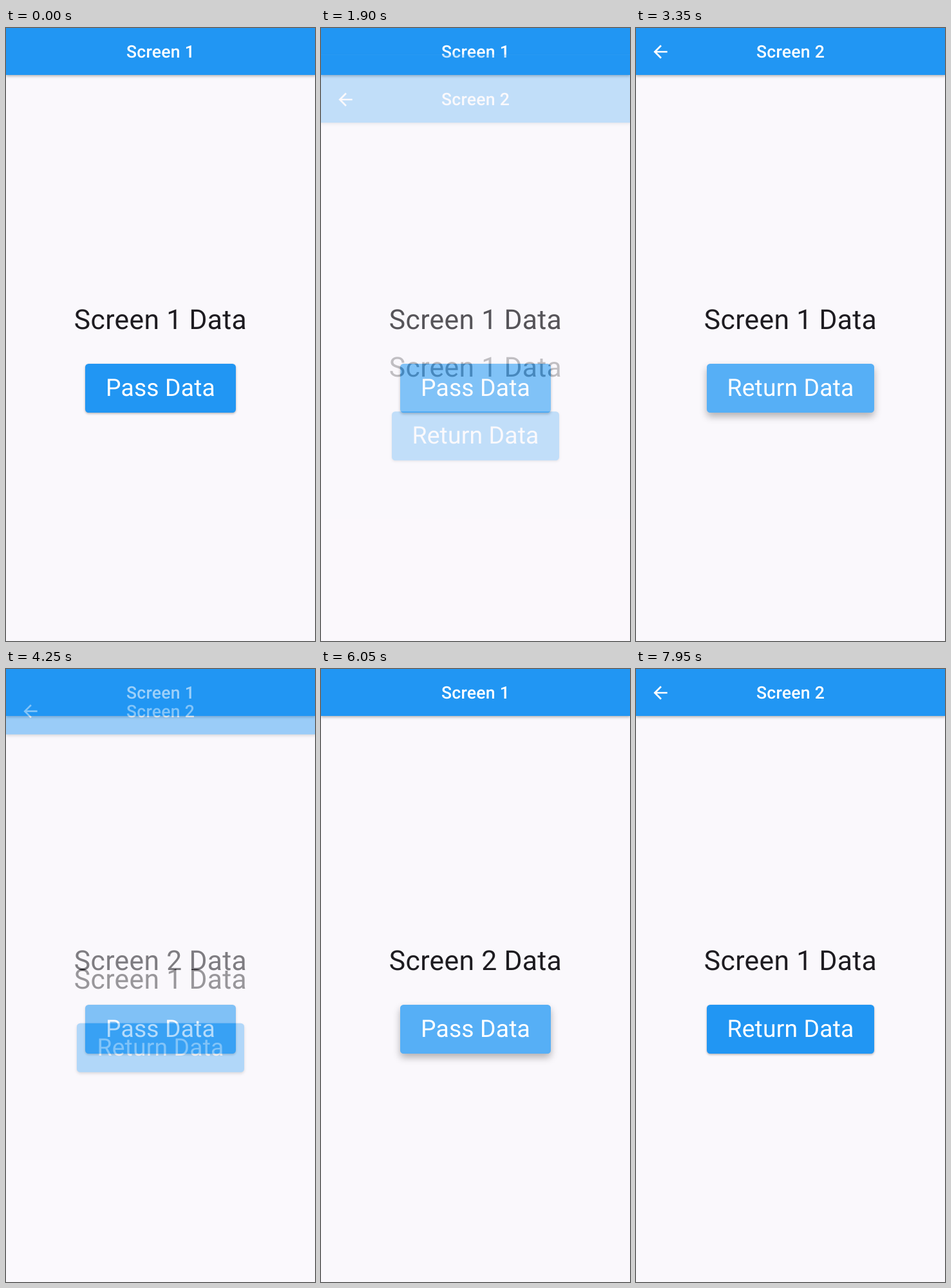
An HTML page for the animation above (8 s loop, 480x953 px).

```html
<!DOCTYPE html>
<html lang="en">
<head>
<meta charset="utf-8">
<title>Passing data between screens</title>
<style>
  html, body { margin: 0; width: 100%; height: 100%; overflow: hidden; background: #faf8fc; }
  #stage {
    position: relative; width: 480px; height: 953px; overflow: hidden;
    font-family: Roboto, "Noto Sans", sans-serif;
    text-rendering: geometricPrecision; text-align: center; white-space: nowrap;
  }
  /* the page reaches up behind the status bar, above the visible stage */
  .page { position: absolute; left: 0; top: 0; width: 480px; height: 953px; }
  .page::before { content: ""; position: absolute; inset: -33px 0 0; background: #faf8fc; }
  .bar {
    position: absolute; left: 0; top: -33px; width: 480px; height: 106px;
    background: #2196f3; box-shadow: 0 2px 4px rgba(0, 0, 0, .28);
  }
  .title {
    position: absolute; left: 0; top: 17px; width: 480px;
    font-size: 26.67px; font-weight: 500; line-height: 40px; letter-spacing: .2px; color: #fff;
  }
  .back { position: absolute; left: 21.5px; top: 20.5px; width: 32px; height: 32px; fill: #fff; }
  .data {
    position: absolute; left: 0; top: 424px; width: 480px;
    font-size: 42.67px; line-height: 60px; letter-spacing: .33px; color: #1d1b20;
  }
  .btn {
    position: absolute; top: 522px; height: 76px; border-radius: 5.3px; background: #2196f3;
  }
  .ink { position: absolute; inset: 0; overflow: hidden; border-radius: 5.3px; }
  .ink i { position: absolute; border-radius: 50%; background: #fff; }
  .btn span {
    position: absolute; inset: 0; font-size: 37.33px; line-height: 76px;
    letter-spacing: .133px; color: #fff;
  }
</style>
</head>
<body>
<div id="stage"></div>
<script>
const LOOP = 8000, STEP = 50, SLIDE = 246.5;
const stage = document.getElementById('stage');

function makeScreen(title, label, width, hasBack) {
  const page = document.createElement('div');
  page.className = 'page';
  const arrow = '<svg class="back" viewBox="0 0 24 24"><path d="M20 11H7.83l5.59-5.59L12 4l-8 8 8 8 1.41-1.41L7.83 13H20z"/></svg>';
  page.innerHTML = `<div class="bar"></div>${hasBack ? arrow : ''}
    <div class="title">${title}</div>
    <div class="data">Screen 1 Data</div>
    <div class="btn"><div class="ink"><i></i></div><span>${label}</span></div>`;
  stage.append(page);
  const btn = page.querySelector('.btn');
  btn.style.width = width + 'px';
  btn.style.left = 240 - width / 2 + 'px';
  return { page, btn, width, data: page.querySelector('.data'), ripple: page.querySelector('i') };
}

const first = makeScreen('Screen 1', 'Pass Data', 234, false);
const second = makeScreen('Screen 2', 'Return Data', 260, true);

// Long presses: the screen changes on release.
const presses = [
  { on: first, x: 312, y: 570, down: 385, up: 1766 },
  { on: second, x: 311, y: 577, down: 2580, up: 4133 },
  { on: first, x: 320, y: 562, down: 5289, up: 6734 }
];

const clamp = v => Math.min(1, Math.max(0, v));
const mix = (a, b, k) => a + (b - a) * k;

function bezier(x1, y1, x2, y2) {
  const at = (a, b, u) => 3 * (1 - u) * (1 - u) * u * a + 3 * (1 - u) * u * u * b + u * u * u;
  return x => {
    if (x <= 0 || x >= 1) return clamp(x);
    let lo = 0, hi = 1;
    for (let i = 0; i < 24; i++) {
      const mid = (lo + hi) / 2;
      if (at(x1, x2, mid) < x) lo = mid; else hi = mid;
    }
    return at(y1, y2, lo);
  };
}
const ease = bezier(.25, .1, .25, 1);
const easeIn = bezier(.42, 0, 1, 1);
const fastOut = bezier(.4, 0, .2, 1);

function route(t) {
  const [push, pop, again] = presses.map(p => clamp((t - p.up) / 300));
  return t < presses[1].up ? push : t < presses[2].up ? 1 - pop : again;
}

function drawButton(screen, t) {
  const p = presses.filter(q => q.on === screen && t >= q.down).pop();
  let lift = 0, alpha = 0;
  if (p) {
    lift = fastOut(clamp((t - p.down) / 200)) * (1 - fastOut(clamp((t - p.up) / 200)));
    alpha = .24 * clamp((t - p.down) / 75) * (1 - clamp((t - p.up - 225) / 150));
    const k = ease(clamp((t - p.down) / 1000));
    const reach = Math.hypot(screen.width, 76) / 2;
    const r = mix(reach * .3, reach + 5, k);
    const x = mix(p.x, 240, k) - (240 - screen.width / 2);
    const y = mix(p.y, 560, k) - 522;
    Object.assign(screen.ripple.style, {
      left: x - r + 'px', top: y - r + 'px', width: 2 * r + 'px', height: 2 * r + 'px'
    });
  }
  screen.ripple.style.opacity = alpha;
  screen.btn.style.boxShadow =
    `0 ${mix(1.6, 6, lift)}px ${mix(3.5, 12, lift)}px rgba(0,0,0,.29)`;
}

function draw(t) {
  // the first push stalls briefly before it shows
  if (t > 1766 && t < 1890) t = 1766;
  const k = route(t);
  first.data.textContent = t < presses[1].up ? 'Screen 1 Data' : 'Screen 2 Data';
  drawButton(first, t);
  drawButton(second, t);
  const s = second.page.style;
  s.visibility = k > 0 ? 'visible' : 'hidden';
  s.opacity = easeIn(k);
  s.transform = k < 1 ? `translateY(${SLIDE * (1 - fastOut(k))}px)` : 'none';
}

const start = performance.now();
function tick() {
  const t = (performance.now() - start) % LOOP;
  draw(Math.floor(t / STEP) * STEP);
  requestAnimationFrame(tick);
}
tick();
</script>
</body>
</html>
```
